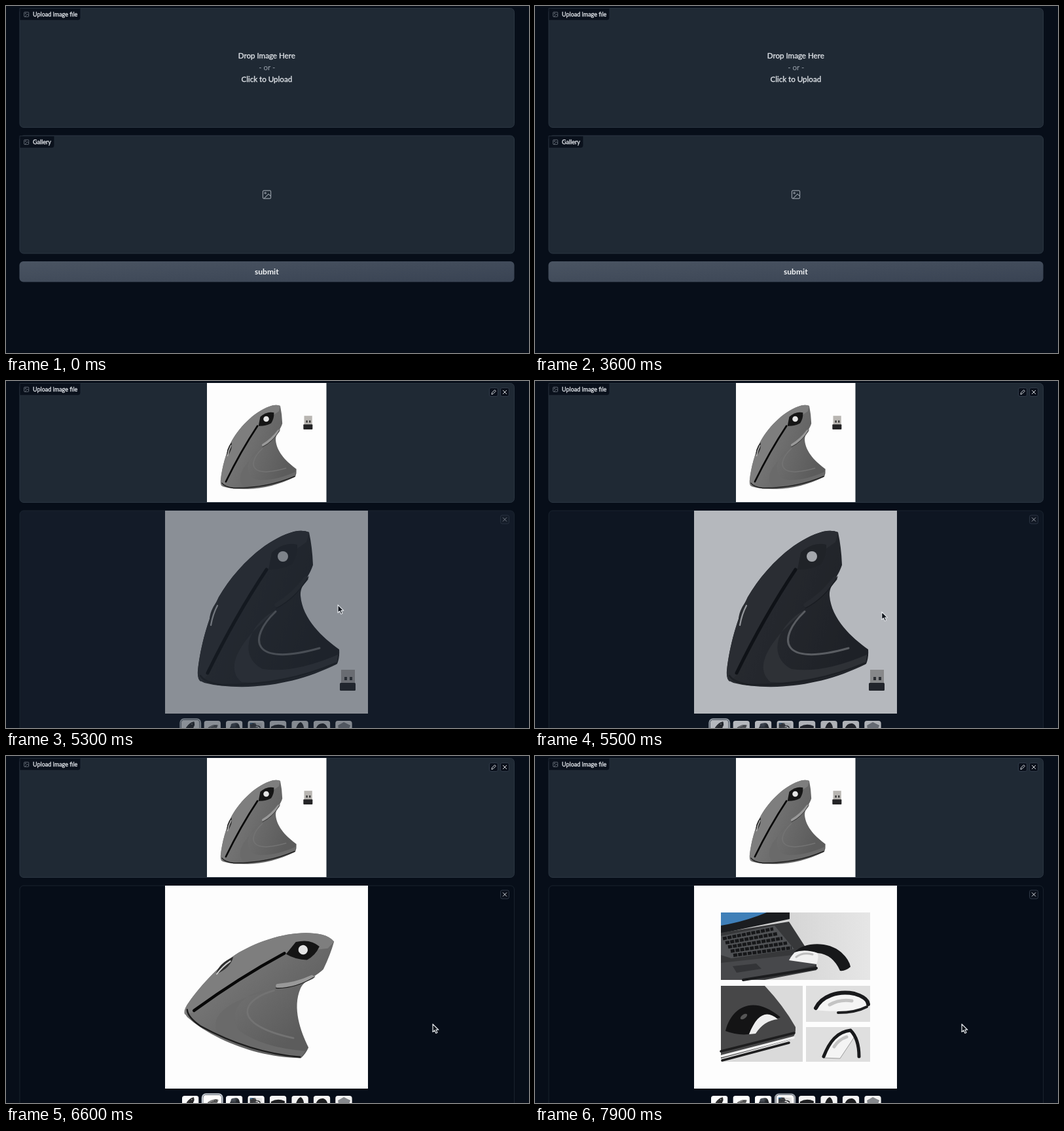
An HTML page for the animation above (8 s loop, 799 px wide and 530 px high).

```html
<!DOCTYPE html>
<html lang="en">
<head>
<meta charset="utf-8">
<title>Image search demo</title>
<style>
  html, body { margin: 0; width: 100%; height: 100%; overflow: hidden; background: #070e19; }
  svg { display: block; width: 100vw; height: 100vh; }
  text { font-family: Lato, "Open Sans", sans-serif; fill: #dfe3e8; }
  .label { font-size: 9px; stroke: #dfe3e8; stroke-width: .35; }
  .drop { font-size: 11.6px; text-anchor: middle; stroke: #dfe3e8; stroke-width: .35; }
  .submit { font-size: 12.1px; font-weight: 700; text-anchor: middle; fill: #f3f5f7; }
</style>
</head>
<body>
<svg id="stage" viewBox="0 0 799 530" xmlns="http://www.w3.org/2000/svg"></svg>
<script>
const LOOP = 8000, STEP = 100;
const THUMB = { x: 269, y: 519, gap: 33.45, size: 25.5 };

const rect = (x, y, w, h, fill, more = '') =>
  `<rect x="${x}" y="${y}" width="${w}" height="${h}" fill="${fill}" ${more}/>`;
const shape = (d, fill, more = '') => `<path d="${d}" fill="${fill}" ${more}/>`;
const line = (d, color, width, more = '') =>
  `<path d="${d}" fill="none" stroke="${color}" stroke-width="${width}" stroke-linecap="round" ${more}/>`;
const move = (x, y, inner, more = '') => `<g transform="translate(${x} ${y}) ${more}">${inner}</g>`;

const pictureIcon = (x, y, size, color) => move(x, y,
  `<g fill="none" stroke="${color}" stroke-width="1.1" stroke-linejoin="round">
    <rect x=".6" y=".6" width="11.8" height="11.8" rx="1.6"/>
    <circle cx="4.2" cy="4.2" r="1.1"/><path d="M2.4 12.2L9 5.6L12.4 9"/></g>`, `scale(${size / 13})`);

const tag = (y, w, text) =>
  shape(`M21 ${y + .5}H${21 + w}V${y + 14.5}Q${21 + w} ${y + 19} ${16.5 + w} ${y + 19}H21Z`, '#0a111c',
    'stroke="#27313d" stroke-width=".8"') +
  pictureIcon(27.3, y + 6, 7.8, '#8b939e') +
  `<text class="label" x="41" y="${y + 13}">${text}</text>`;

const button = (x, y, glyph) =>
  rect(x + .5, y + .5, 13, 13, '#0a101b', 'rx="2.5" stroke="#343e4c" stroke-width=".9"') +
  move(x, y, line(glyph, '#d5d9de', 1));
const CROSS = 'M4.3 4.3L9.7 9.7M9.7 4.3L4.3 9.7';
const PENCIL = 'M4 10L4.5 7.8L8.6 3.7L10.3 5.4L6.2 9.5Z';

const BODY = 'M440 230Q453 227 463 231Q468 254 469 281C463 300 449 312 450 328C453 364 484 392 509 410' +
  'Q510 422 506 432C460 455 415 465 370 467Q330 468 303 461Q292 457 293 443C297 405 309 362 325 330C350 287 395 242 440 230Z';

// Upright mouse; c: grip body, left side, pad, trim, side buttons
const uprightMouse = c =>
  shape(BODY, c.body) +
  shape('M440 230Q453 227 463 231L459 246L400 287Q350 362 309 448L298 459Q292 457 293 443C297 405 309 362 325 330C350 287 395 242 440 230Z', c.side) +
  shape('M412 350C370 372 354 420 392 440Q440 447 507 418Q506 428 504 433Q430 465 360 460Q330 435 380 380Z', c.pad) +
  line('M398 288Q350 360 308 446', '#080808', 5) +
  line('M297 450Q304 461 330 464Q425 465 504 431', '#1c1c1c', 2.6) +
  line('M412 352C370 392 372 438 479 408', c.trim, 3) +
  shape('M406 262Q425 245 445 250Q446 267 437 280Q420 289 401 288Z', c.patch) +
  '<circle cx="423" cy="268" r="8" fill="#e4e4e4"/>' +
  line('M414 342Q440 326 458 302', c.keys, 7) +
  line('M413 347Q442 333 462 299', '#151515', 1.2) +
  shape('M312 374Q307 356 324 334Q329 352 312 374Z', '#303030') +
  line('M313 373Q316 356 323 343', '#cfcfcf', 2.2);

const dongle =
  rect(512, 441, 21, 21, '#b9b6b2') + rect(517, 452, 4, 5, '#333') + rect(525, 452, 4, 5, '#333') +
  rect(510, 461, 24, 12, '#242426', 'rx="1.5"');

const BLACK = { body: 'url(#ink)', side: '#303031', pad: '#353536', trim: '#777', patch: '#202021', keys: '#2b2b2c' };
const GREY = { body: 'url(#steel)', side: '#7e7e7e', pad: '#6a6a6a', trim: '#737373', patch: '#151515', keys: '#999' };

const sheet = inner => rect(243, 198, 310, 310, '#fdfdfd') + inner;

const domeMouse =
  '<ellipse cx="325" cy="445" rx="60" ry="17" fill="#a9aaac" filter="url(#soft)"/>' +
  shape('M341 258C365 248 390 239 424 238C442 238 458 241 472 252C484 262 491 278 496 300C502 315 508 335 506 358' +
    'C502 384 485 404 466 426C448 446 440 462 420 462C375 462 330 452 290 438C278 432 271 422 275 405' +
    'C284 372 296 352 308 342C330 318 338 285 341 258Z', 'url(#dome)') +
  line('M278 420Q300 441 372 451Q425 456 444 441', '#0c0d0f', 4) +
  line('M372 252C382 283 374 322 383 342C402 376 460 376 503 330', '#08090a', 2.4) +
  line('M374 252C384 283 376 322 385 341C404 374 460 374 502 328', '#50565e', .7) +
  line('M426 297Q455 285 488 289', '#0a0b0c', 2) +
  shape('M437 293L456 286L460 299L443 304Z', '#08090a') +
  shape('M459 286Q468 279 480 284L482 296L463 299Z', '#181a1d') +
  line('M443 292L456 289M464 287L477 286', '#777c83', 1.4) +
  '<text transform="translate(462 409) rotate(-47)" font-size="11.5" font-weight="700" style="fill:#8b8e92">' +
  '<tspan font-size="15">T</tspan>ULO <tspan font-size="13">F</tspan>ERN</text>' +
  shape('M495 443L499 431L509 428L536 437L533 457L522 459Z', '#2a2c2f') +
  line('M501 434L531 443', '#686b6f', 1.3) +
  shape('M489 444L526 455L520 474L484 465Z', '#b5b5b3', 'stroke="#3c3f42" stroke-width="1.2"') +
  shape('M495 452L504 455L501 463L492 461ZM509 457L518 459L515 467L506 465Z', '#232527');

const keyRows = Array.from({ length: 5 }, (_, i) =>
  line(`M${287 + i * 4} ${279 + i * 6.4}L${364 + i * 7} ${264 + i * 7.2}`, '#161719', 5,
    'stroke-dasharray="6 1.4" style="stroke-linecap:butt"')).join('');

const collage =
  rect(284, 239, 228, 103, 'url(#desk)') + rect(284, 351, 125, 116, '#dadada') +
  rect(414, 351, 98, 55, '#dfdfdf') + rect(414, 414, 98, 53, '#dfdfdf') +
  shape('M284 239H389V249L284 271Z', '#1b1d20') +
  shape('M284 239H354Q320 253 284 259Z', '#3f7fb8') +
  shape('M284 270L388 253L430 318V327L351 342H284Z', '#37383a') +
  shape('M284 275L366 259L396 295L300 309L284 304Z', '#505255') + keyRows +
  shape('M284 316L421 301L430 319L340 342H284Z', '#47484b') +
  shape('M302 321L338 317L346 325L308 331Z', '#333437') +
  line('M318 342L430 324', '#1b1c1e', 4) +
  shape('M388 312C398 293 412 288 428 297Q436 303 430 318Z', '#f1f1f1') +
  line('M399 307Q409 299 424 303', '#bcbcbc', 3) +
  shape('M396 300C410 284 448 282 468 300Q480 311 482 322Q474 329 466 328Q455 303 432 301Q412 294 396 300Z', '#17181a') +
  shape('M284 351H351Q380 382 398 414Q399 427 391 433L284 462Z', '#474748') +
  line('M284 451L396 423M286 465L388 438', '#1d1d1e', 3.5) +
  line('M285 458.5L395 430', '#f0f0f0', 3.5) +
  shape('M291 420C300 383 334 364 375 399L368 402C350 388 338 400 327 425Q309 427 291 420Z', '#141415') +
  shape('M327 425C339 394 354 387 371 402Q350 404 337 424Z', '#eee') +
  '<ellipse cx="319" cy="398" rx="6" ry="3" transform="rotate(-35 319 398)" fill="#555"/>' +
  shape('M427 388C437 368 460 358 485 362Q505 368 509 380Q485 394 427 388Z', '#f4f4f4') +
  line('M450 380Q466 371 484 374', '#c4c4c4', 5) +
  line('M429 385C438 367 462 358 488 363Q508 369 509 379', '#191a1c', 6) +
  line('M463 392Q490 392 507 383', '#1d1e20', 4) +
  shape('M440 461C448 438 462 420 485 420L490 426L466 462Z', '#f4f4f4', 'stroke="#888" stroke-width=".8"') +
  line('M457 444Q464 433 476 429', '#c4c4c4', 5) +
  line('M441 459C450 436 462 421 482 419Q495 432 495 459', '#191a1c', 5);

const photos = [
  sheet(uprightMouse(BLACK) + dongle),
  sheet(`<g transform="rotate(28 398 353) translate(398 353) scale(.9) translate(-398 -353)">${uprightMouse(GREY)}</g>`),
  sheet(domeMouse),
  sheet(collage)
];

// Only the top of each small picture is on the stage
const tops = [
  'M2 9Q12 3 23 8V14H2Z', 'M6 14Q9 3 14 2Q19 5 19 14Z',
  'M3 14Q6 3 15 4Q21 6 22 14Z', 'M4 7L13 2L23 7L20 14H5Z'
];
const thumbPicture = i => i < 4
  ? `<use href="#photo${i}" transform="scale(.0824) translate(-243.5 -198)"/>`
  : rect(0, 0, 26, 26, '#f4f4f4') + shape(tops[i - 4], i === 7 ? '#85888c' : '#1d1e20');

const thumbs = Array.from({ length: 8 }, (_, i) =>
  `<g id="thumb${i}"><g clip-path="url(#round)">${thumbPicture(i)}</g>` +
  rect(-1.2, -1.2, 27.9, 27.9, 'none', 'class="ring" rx="5" stroke-width="2"') + '</g>').join('');

const stage = document.getElementById('stage');
stage.innerHTML = `
<defs>
  <linearGradient id="btn" x2="1" y2="1"><stop stop-color="#4a5462"/><stop offset="1" stop-color="#394353"/></linearGradient>
  <linearGradient id="ink" x2="1" y2=".4"><stop stop-color="#303031"/><stop offset="1" stop-color="#1e1e1f"/></linearGradient>
  <linearGradient id="steel" x2="1" y2=".4"><stop stop-color="#828282"/><stop offset="1" stop-color="#5c5c5c"/></linearGradient>
  <linearGradient id="desk"><stop stop-color="#c7c7c7"/><stop offset="1" stop-color="#e6e6e6"/></linearGradient>
  <radialGradient id="dome" cx=".46" cy=".12" r=".75"><stop stop-color="#565d66"/><stop offset=".45" stop-color="#2c3036"/><stop offset="1" stop-color="#121316"/></radialGradient>
  <filter id="soft"><feGaussianBlur stdDeviation="4"/></filter>
  <clipPath id="round"><rect width="${THUMB.size}" height="${THUMB.size}" rx="4"/></clipPath>
  ${photos.map((p, i) => `<g id="photo${i}">${p}</g>`).join('')}
</defs>
${rect(0, 0, 799, 530, '#070e19')}
${rect(21, 3.5, 755.5, 182, '#1f2934', 'rx="6" stroke="#2a3541"')}
<g id="empty">
  <text class="drop" x="398.3" y="80">Drop Image Here</text>
  <text class="drop" x="398.7" y="98" style="fill:#9aa2ac;stroke:none">- or -</text>
  <text class="drop" x="398.3" y="116.3">Click to Upload</text>
  ${rect(21, 198, 755.5, 180, '#1f2934', 'rx="6" stroke="#2a3541"')}
  ${tag(198, 53, 'Gallery')}
  ${pictureIcon(391.8, 281.3, 13.4, '#959da6')}
  ${rect(20.5, 390, 756, 31.5, 'url(#btn)', 'rx="6"')}
  <text class="submit" x="398.3" y="410.3">submit</text>
</g>
<g id="filled">
  ${rect(307, 3, 182.5, 182, '#fdfdfd')}
  ${move(170.8, -86.2, uprightMouse(GREY), 'scale(.536 .538)')}
  ${move(157, -233.5, dongle, 'scale(.583 .65)')}
  ${button(738, 10, PENCIL)}${button(755, 10, CROSS)}
  ${rect(21, 198, 755.5, 345, '#060d18', 'rx="6" stroke="#19222d"')}
  <use id="photo"/>
  ${button(755, 204.5, CROSS)}
  ${thumbs}
  ${rect(21, 198, 755.5, 345, '#1f2937', 'id="veil" rx="6"')}
</g>
${tag(3, 93, 'Upload image file')}
<path id="cursor" d="M0 0V12L2.8 9.5L4.8 14L7 13L5 8.7H8.8Z" fill="#10151c" stroke="#dcdfe3" stroke-width="1.2" stroke-linejoin="round"/>`;

const $ = id => document.getElementById(id);
const clamp = v => Math.min(1, Math.max(0, v));
const ease = v => v * v * (3 - 2 * v);
const mix = (a, b, k) => a + (b - a) * k;
const last = (list, t) => list.filter(e => e[0] <= t).pop();

const pictures = [[0, 0], [6500, 1], [7200, 2], [7900, 3]];
// time, selected thumb, strength of its ring
const rings = [[0, 0, 1], [6500, 0, .2], [6600, 1, 1], [7200, 1, .1], [7300, 2, .5], [7400, 2, 1], [7900, 3, .8]];
// time span and the points the pointer travels between
const trips = [
  [200, 600, 520, 470, 375, 276], [1000, 1000, 373, 273, 373, 273],
  [4800, 5300, 492, 356, 507, 342], [5300, 6100, 507, 342, 652, 409.5]
];

function drawCursor(t) {
  const shown = (t >= 200 && t < 3600) || t >= 4800;
  $('cursor').style.display = shown ? '' : 'none';
  if (!shown) return;
  const [from, to, x0, y0, x1, y1] = last(trips, t);
  const k = ease(clamp((t - from) / (to - from || 1)));
  $('cursor').setAttribute('transform', `translate(${mix(x0, x1, k)} ${mix(y0, y1, k)})`);
}

function drawThumbs(t) {
  const [, chosen, power] = last(rings, t);
  for (let i = 0; i < 8; i++) {
    const on = i === chosen ? power : 0, scale = 1 + .1 * on, shift = THUMB.size * (1 - scale) / 2;
    const el = $('thumb' + i), ring = el.querySelector('.ring');
    el.setAttribute('transform',
      `translate(${THUMB.x + i * THUMB.gap + shift} ${THUMB.y + shift}) scale(${scale})`);
    ring.style.stroke = on > .2 ? '#c3cad1' : '#a98468';
    ring.style.opacity = on ? Math.max(.6, on) : 0;
  }
}

function draw(time) {
  const t = Math.floor(time / STEP) * STEP, done = t >= 4800;
  $('empty').style.display = done ? 'none' : '';
  $('filled').style.display = done ? '' : 'none';
  if (done) {
    $('photo').setAttribute('href', '#photo' + last(pictures, t)[1]);
    $('veil').setAttribute('opacity', clamp(1 - (t - 4800) / 1040));
    drawThumbs(t);
  }
  drawCursor(t);
}

const start = performance.now();
function tick() {
  draw((performance.now() - start) % LOOP);
  requestAnimationFrame(tick);
}
tick();
</script>
</body>
</html>
```
